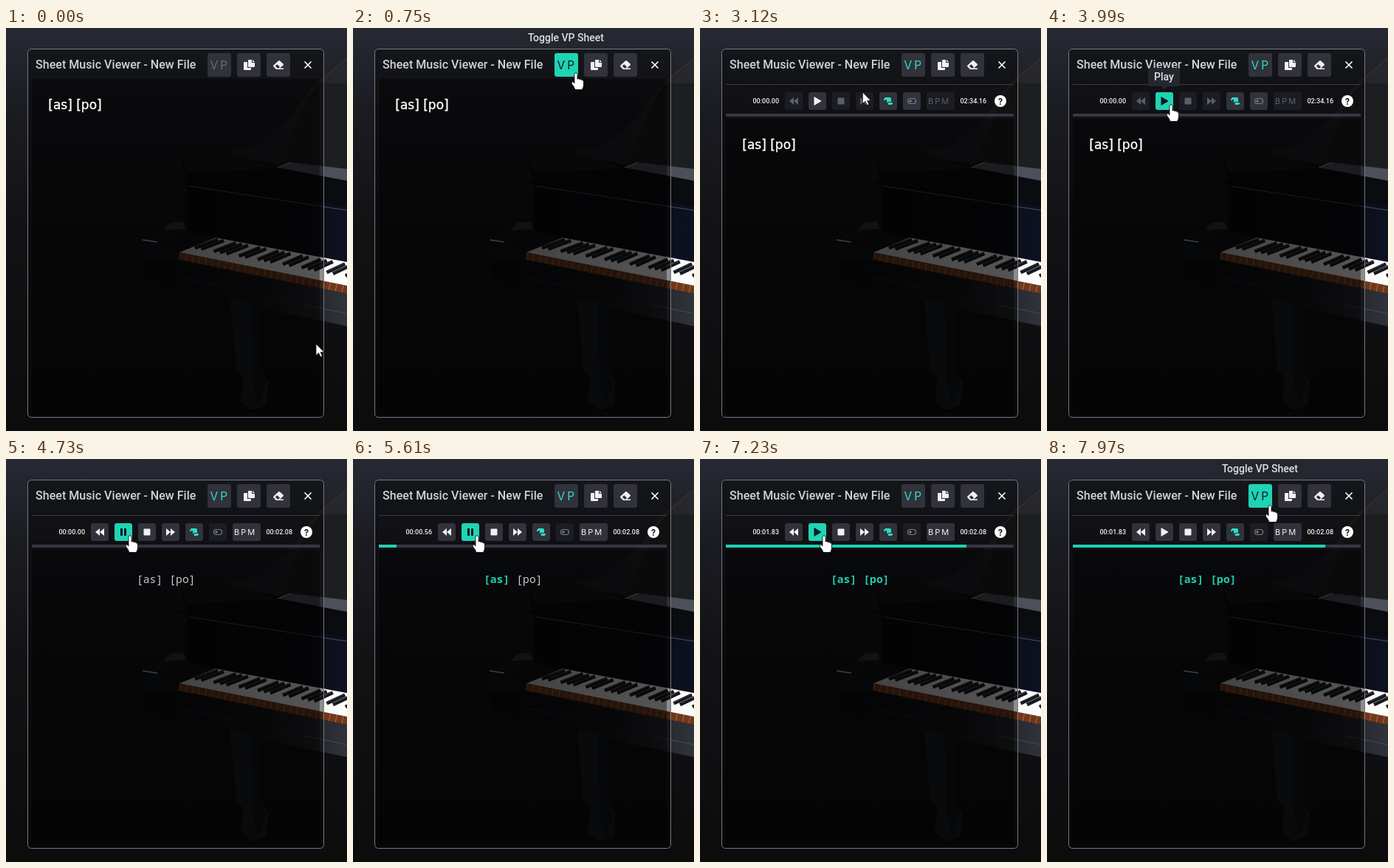
Recreate the animation shown at these times as an HTML page. Size 462x546 px, loop 8 s.

```html
<!DOCTYPE html>
<html lang="en">
<head>
<meta charset="utf-8">
<title>Sheet Music Viewer</title>
<style>
html, body { margin: 0; width: 100%; height: 100%; overflow: hidden; background: #0d0d0f; }
svg { display: block; width: 462px; height: 546px; }
text { font-family: Roboto, Arial, sans-serif; font-weight: 500; fill: #dcdee2; white-space: pre; }
.title { font-size: 16.08px; fill: #d0d2d7; }
.time { font-size: 9px; fill: #f2f2f4; }
.tip rect, .tip path { fill: #25272d; }
.tip text { font-size: 14px; text-anchor: middle; }
.btn rect { fill: #31323b; }
.btn .ico { fill: #f1f1f3; }
.btn.off rect { fill: #1c1d23; }
.btn.off .ico { fill: #5d5f67; }
.btn.hot rect { fill: #1fd4b4; }
.btn.hot .ico { fill: #0e1a1f; }
.btn.on:not(.hot) .ico { fill: #2fdcc0; }
.brand, .bpm { font-family: Inter, Roboto, sans-serif; font-weight: 400; }
.brand { font-size: 15.5px; letter-spacing: 3px; }
.bpm { font-size: 11px; letter-spacing: 2px; }
#plain { font: 400 17px "DejaVu Sans", Verdana, sans-serif; fill: #fff; stroke: #fff; stroke-width: .35; }
#chords text { font: 400 14.67px "Noto Sans Mono", monospace; fill: #c9cacc; }
#chords text.lit { font-weight: 700; fill: #1dd1b1; }
</style>
</head>
<body>
<svg viewBox="0 0 462 546">
  <defs>
    <linearGradient id="wall" x2="0" y2="1">
      <stop offset="0" stop-color="#272a33"/>
      <stop offset=".2" stop-color="#1b1c22"/>
      <stop offset=".5" stop-color="#121215"/>
      <stop offset="1" stop-color="#0c0c0d"/>
    </linearGradient>
    <linearGradient id="ivory">
      <stop offset="0" stop-color="#c4c4c6"/>
      <stop offset=".7" stop-color="#f0f0f0"/>
      <stop offset="1" stop-color="#fff"/>
    </linearGradient>
    <linearGradient id="navy">
      <stop offset="0" stop-color="#08080b"/>
      <stop offset=".65" stop-color="#0a0b11"/>
      <stop offset="1" stop-color="#0d1122"/>
    </linearGradient>
    <linearGradient id="rail">
      <stop offset="0" stop-color="#0a0b0e"/>
      <stop offset=".6" stop-color="#15161a"/>
      <stop offset="1" stop-color="#30333b"/>
    </linearGradient>
    <linearGradient id="lid">
      <stop offset="0" stop-color="#1a1a1e"/>
      <stop offset="1" stop-color="#27282e"/>
    </linearGradient>
  </defs>

  <rect width="462" height="546" fill="url(#wall)"/>
  <g id="piano">
    <path d="M462 75H418L370 187L462 192Z" fill="#1d1e20"/>
    <path d="M462 41L418 75L389 118L342 158L240 180L246 190L369 188L418 75H462Z" fill="url(#lid)"/>
    <path d="M462 41L431 67L400 102" fill="none" stroke="#3a2b27" stroke-width="2"/>
    <path d="M238 180L300 172L372 186L462 204V246L246 212Z" fill="#0b0c10"/>
    <path d="M238 174L300 168L368 190L246 196Z" fill="#1a1713"/>
    <path d="M368 189L386 182L462 191V207Z" fill="#4c505b"/>
    <path d="M368 189L386 182" stroke="#a9afbb"/>
    <path d="M232 205L462 242V322L285 284L246 276V213Z" fill="url(#navy)"/>
    <path d="M248 214L462 247" stroke="#4b4e58"/>
    <path d="M185 287L222 263L240 262L247 276L205 291L235 304V318L186 318Z" fill="#121317"/>
    <path d="M222 264L240 262L244 272L214 274Z" fill="#33353b"/>
    <path d="M185 287L205 290" stroke="#b8bac0" stroke-width="1.5"/>
    <path d="M186 318L235 314L462 360V404L330 376L190 342Z" fill="url(#rail)"/>
    <path d="M235 338L462 387" stroke="#24262c"/>
    <path d="M405 375L462 387" stroke="#4a4d56"/>
    <path d="M304 368L346 374L347 466L356 480L353 511L334 518L318 506L322 474L312 462Z" fill="#1b1c21"/>
    <path d="M332 373L346 374L347 466L352 484L342 512L334 480Z" fill="#121317"/>
    <path d="M235 304L284 284L462 317V350Z" fill="url(#ivory)"/>
    <path d="M235 304L462 349V360L235 314Z" fill="#6f381b"/>
    <path d="M235 309L462 354.500" stroke="#d9a27c" stroke-width="10" stroke-dasharray="1 8" opacity=".5"/>
    <g id="sharps" stroke-width="4.8"></g>
  </g>

  <rect x="29.5" y="28.5" width="401" height="499" rx="5" fill="#000" fill-opacity=".43" stroke="#77797f"/>
  <rect id="sheet" x="35" width="390" fill="#000" fill-opacity=".4"/>

  <text class="title" x="40" y="55">Sheet Music Viewer - New File</text>
  <g class="btn" id="vp"><rect x="273" y="34" width="32" height="32" rx="3"/><text class="ico brand" x="276.5" y="55.5">VP</text></g>
  <g class="btn"><rect x="313" y="34" width="32" height="32" rx="3"/>
    <path class="ico" d="M323 46h4v8h5v2q0 1-1 1h-8q-1 0-1-1v-9q0-1 1-1zM329 43h4v4h4v5q0 1-1 1h-7q-1 0-1-1v-8q0-1 1-1zM334 43l3 3h-3z"/></g>
  <g class="btn"><rect x="353" y="34" width="32" height="32" rx="3"/>
    <path class="ico" fill-rule="evenodd" d="M362.500 50.500L369 44.500q1-1 2 0l4.500 4q1 1 0 2L371 54.500h5V56h-10l-3.500-3.500q-1-1 0-2zM364.800 51.400l3 3h1.500l1.700-1.600-3.500-3.500z"/></g>
  <path d="M404.500 45.500l9 9m0-9l-9 9" stroke="#fff" stroke-width="1.6"/>

  <g id="bar">
    <path d="M35 76.500H425" stroke="#3b3c42"/>
    <text class="time" id="now" x="71.500" y="102"></text>
    <text class="time" id="total" x="352.500" y="102"></text>
    <g class="btn" id="back"><rect x="115" y="87" width="24" height="24" rx="3"/><path class="ico" d="M127 94v10l-6-5zM133 94v10l-6-5z"/></g>
    <g class="btn" id="play"><rect x="147" y="87" width="24" height="24" rx="3"/><path class="ico" id="playIcon"/></g>
    <g class="btn" id="stop"><rect x="179" y="87" width="24" height="24" rx="3"/><rect class="ico" x="186.500" y="94.500" width="9" height="9" rx="1"/></g>
    <g class="btn" id="next"><rect x="211" y="87" width="24" height="24" rx="3"/><path class="ico" d="M217 94v10l6-5zM223 94v10l6-5z"/></g>
    <g class="btn on"><rect x="243" y="87" width="24" height="24" rx="3"/>
      <path class="ico" d="M251 94h6q2 0 2 2v4h-4q-2 0-2 2v-5h-3v-1q0-2 1-2zM254.500 101h6.500q0 3-2 3h-4.500q1-1 0-3zM249 96h2v2h-2z"/></g>
    <g class="btn" id="mode"><rect x="275" y="87" width="24" height="24" rx="3"/>
      <rect x="281.500" y="95.500" width="11" height="7" rx="3.500" style="fill:none" stroke="#7b7d86" stroke-width="1.2"/><circle cx="285" cy="99" r="1.700" fill="#7b7d86"/></g>
    <g class="btn" id="bpm"><rect x="307" y="87" width="38" height="24" rx="3"/><text class="ico bpm" x="309" y="103">BPM</text></g>
    <circle cx="407" cy="99" r="8" fill="#fff"/>
    <text x="407" y="103.500" font-size="12" text-anchor="middle" style="fill:#16171b;font-weight:700">?</text>
    <rect x="35" y="116" width="390" height="4" fill="#363741"/>
    <rect id="fill" x="35" y="116" height="4" fill="#1dd1b1"/>
  </g>

  <text id="plain" x="57.300">[as] [po]</text>
  <g id="chords"><text id="as" x="177" y="168">[as]</text><text id="po" x="221.300" y="168">[po]</text></g>

  <g class="tip" id="tipVp"><rect x="230" y="1" width="117" height="25" rx="3"/><text x="288.500" y="18">Toggle VP Sheet</text></g>
  <g class="tip" id="tipPlay"><rect x="137" y="54" width="43" height="25" rx="3"/><path d="M154 78h10l-5 5z"/><text x="158.500" y="71">Play</text></g>

  <g id="cursor">
    <path id="arrow" d="M0 0V15.500L3.600 12.200L6 17.500L8.500 16.400L6.200 11.200H11Z" fill="#fff" stroke="#111" stroke-width=".8"/>
    <path id="hand" d="M-2 1.800Q-2-.2 0-.2T2 1.800V8Q4 6.800 5 8.700Q7 7.700 8 9.700Q10.500 9 10.500 12V16Q10.500 19 8.500 22.500H-1Q-2 19-5.500 14.800Q-6.500 12.500-4.500 12Q-3 12-2 14Z" fill="#fff" stroke="#15161a" stroke-width=".9"/>
  </g>
</svg>
<script>
const LOOP = 8000, STEP = 124.6, START = 5.047;
const $ = id => document.getElementById(id);
const show = (id, on) => { $(id).style.opacity = +on; };
const within = (k, a, b) => k >= a && k < b;

// Sharps sit on white-key joints, except two per octave.
let keys = '';
for (let j = 0; j < 25; j++) {
  if (j % 7 === 2 || j % 7 === 6) continue;
  const x = 256 + 8.5 * j, y = 298 + 1.58 * j, w = 31 - 0.3 * j;
  keys += `<path d="M${x} ${y}l${w} -11.500" stroke="#15161b"/>` +
    `<path d="M${x + 1} ${y - 2}l${w - 2} -10.500" stroke="#3b3d45" stroke-width="1"/>`;
}
$('sharps').innerHTML = keys;

// Interpolates rows of [position, ...values].
function track(p, rows, ease = u => u) {
  let i = rows.findIndex(r => r[0] > p);
  if (i === 0) return rows[0].slice(1);
  if (i < 0) return rows[rows.length - 1].slice(1);
  const a = rows[i - 1], b = rows[i];
  const u = ease((p - a[0]) / (b[0] - a[0]));
  return a.slice(1).map((v, n) => v + (b[n + 1] - v) * u);
}
const smooth = u => u * u * (3 - 2 * u);

const PATH = [[0, 420, 428], [1, 420, 428], [5, 302, 61], [17, 301, 61], [21, 301, 61],
  [28, 168, 104], [58, 168, 104], [62, 302, 63]];
const PROGRESS = [[0, 0], [.3, 6], [.56, 24], [.9, 85], [1.83, 268], [2.18, 326], [2.5, 341], [2.7, 342]];
const PLAY = 'M154.500 93.500Q154.500 93 155 93.200L164 98.500Q164.500 99 164 99.500L155 104.800Q154.500 105 154.500 104.500Z';
const PAUSE = 'M155 94h3v10h-3zM160 94h3v10h-3z';

function draw(time) {
  const k = Math.floor((time % LOOP + 6) / STEP);
  const secs = k * STEP / 1000 - START;
  const open = k >= 16, started = k >= 34, playing = within(k, 34, 56);
  const onVp = within(k, 5, 21) || k >= 62;
  const onPlay = within(k, 27, 60);

  show('bar', open);
  $('sheet').setAttribute('y', open ? 123 : 69);
  $('sheet').setAttribute('height', open ? 399 : 453);
  $('plain').setAttribute('y', open ? 164 : 110);
  show('plain', !started);
  show('chords', started);
  $('as').classList.toggle('lit', k >= 41);
  $('po').classList.toggle('lit', k >= 49);

  const vp = $('vp').classList;
  vp.toggle('hot', onVp);
  vp.toggle('on', open);
  $('vp').querySelector('text').style.fill = !open && !onVp ? '#6c6e76' : '';
  $('play').classList.toggle('hot', onPlay);
  $('playIcon').setAttribute('d', playing ? PAUSE : PLAY);
  for (const id of ['back', 'stop', 'next', 'bpm']) $(id).classList.toggle('off', !started);
  $('mode').classList.toggle('off', started);

  const pos = Math.max(0, Math.min(1.83, secs));
  $('now').textContent = '00:' + pos.toFixed(2).padStart(5, '0');
  $('total').textContent = started ? '00:02.08' : '02:34.16';
  $('fill').setAttribute('width', track(secs, PROGRESS)[0]);

  show('tipVp', within(k, 6, 21) || k >= 64 ? 1 : k === 5 || k === 63 ? .5 : 0);
  show('tipPlay', within(k, 30, 34) ? 1 : k === 29 || k === 34 ? .5 : 0);

  const [x, y] = track(k, PATH, smooth);
  $('cursor').setAttribute('transform', `translate(${x} ${y})`);
  show('hand', onVp || onPlay);
  show('arrow', !onVp && !onPlay);
}

function tick() {
  draw(performance.now());
  requestAnimationFrame(tick);
}
tick();
</script>
</body>
</html>
```
